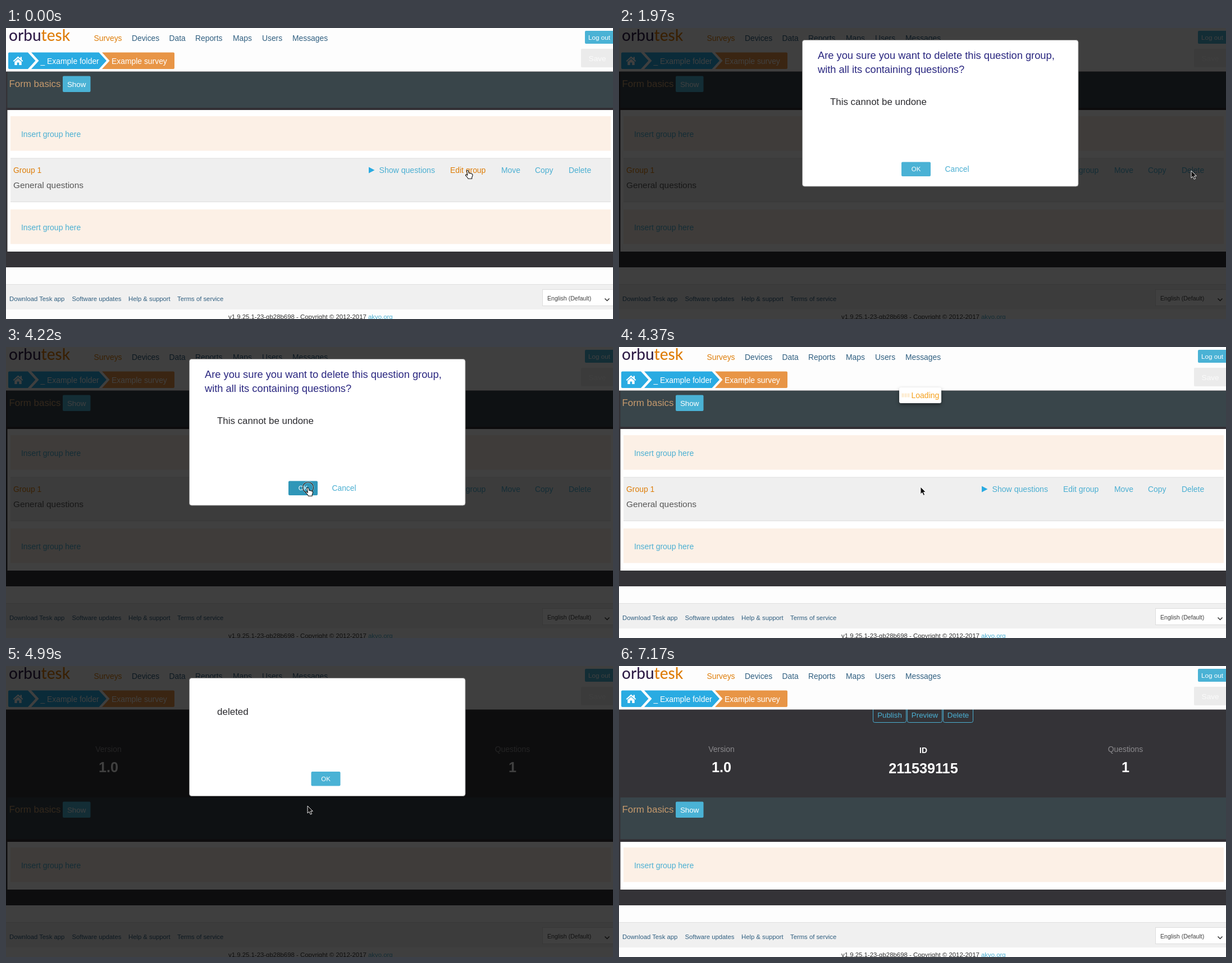
Animation, 1081 px wide and 518 px high, one loop 8170 ms. Source, as an HTML page:

```html
<!DOCTYPE html>
<html lang="en">
<head>
<meta charset="utf-8">
<title>Delete a question group</title>
<style>
html, body { margin: 0; width: 100%; height: 100%; overflow: hidden; background: #fdfdfd; }
svg { display: block; font-family: "Liberation Sans", Arial, sans-serif; }
text { white-space: pre; }
#pill rect:first-child { filter: drop-shadow(0 3px 3px #0006); }
</style>
</head>
<body>
<svg id="stage" width="1081" height="518" viewBox="0 0 1081 518"></svg>
<script>
const LOOP = 8170;
const BLUE = '#29abe2', TEAL = '#4bafd2', BUTTON = '#4ab2d5', PRESSED = '#2f96b8';
const ORANGE = '#de7d08', NAVY = '#305f80', DARK = '#343337';

const rect = (x, y, w, h, fill, more = '') =>
  `<rect x="${x}" y="${y}" width="${w}" height="${h}" fill="${fill}" ${more}/>`;
const text = (x, y, size, fill, str, more = '') =>
  `<text x="${x}" y="${y}" font-size="${size}" fill="${fill}" ${more}>${str}</text>`;
const path = (d, fill, more = '') => `<path d="${d}" fill="${fill}" ${more}/>`;
const group = (id, ...parts) => `<g id="${id}">${parts.join('')}</g>`;
const row = (y, size, fill, items) =>
  items.map(([x, str, more]) => text(x, y, size, fill, str, more)).join('');
const middle = 'text-anchor="middle"', bold = middle + ' font-weight="bold"';

const insertBar = y =>
  rect(8, y, 1069, 61.5, '#fcf0e6') + text(27, y + 36.5, 13.95, TEAL, 'Insert group here');

const basics = (y, h) =>
  rect(2.5, y, 1079, h, '#39454a') + rect(0, y + h, 1081, 4, '#322f34') +
  text(5.5, y + 27, 16.9, '#c69a6d', 'Form basics') +
  rect(101, y + 7.5, 49.5, 28.5, BUTTON, 'rx="2"') +
  text(125.7, y + 27, 13.4, '#fff', 'Show', middle);

const outlined = (x, w, str) =>
  rect(x + .5, 70, w, 30.5, 'none', `stroke="${TEAL}" rx="3"`) +
  text(x + w / 2 + .5, 92, 13.3, TEAL, str, middle);

const stat = (x, y, label, value, color, weight) =>
  text(x, y, 13.9, color, label, weight) + text(x, y + 36, 25.2, '#fff', value, bold);

const modal = (id, h, okX, ...parts) => group(id,
  rect(0, 0, 1081, 518, '#000', 'opacity=".75"'),
  rect(326.5, 21.5, 491.5, h, '#fff', 'rx="4" stroke="#8a8a8a"'),
  rect(okX, h - 22, 52, 25.5, BUTTON, `rx="2" id="${id}Ok"`),
  text(okX + 26, h - 5.5, 11.4, '#fff', 'OK', middle), ...parts);

const actions = [['edit', 791, 64, 'Edit group'], ['move', 882, 34, 'Move'],
  ['copy', 942, 33, 'Copy'], ['del', 1002, 39, 'Delete']];

const listPage = group('list',
  basics(78, 64),
  rect(2.5, 146, 1079, 252, '#fff'),
  insertBar(157),
  rect(8, 232, 1069, 78, '#efefef'),
  rect(8, 231.5, 1069, 1, '#dedede'), rect(8, 309, 1069, 1, '#dedede'),
  text(13, 258, 13.9, ORANGE, 'Group 1'),
  text(13, 285, 15.4, '#575757', 'General questions'),
  path('M646 247.5L656.5 253L646 258.5Z', BLUE),
  text(664.5, 258, 14.1, TEAL, 'Show questions'),
  ...actions.map(([id, x, , str]) => text(x, 258, 13.9, TEAL, str, `id="${id}"`)));

const emptyPage = group('empty',
  outlined(452, 59, 'Publish'), outlined(513, 62, 'Preview'), outlined(577, 53, 'Delete'),
  stat(182.5, 153, 'Version', '1.0', '#8b8a8d', middle),
  stat(542, 155, 'ID', '211539115', '#fff', bold),
  stat(902, 153, 'Questions', '1', '#8b8a8d', middle),
  basics(234, 74.5),
  rect(2.5, 313, 1079, 85, '#fff'));

const header =
  rect(0, 0, 1081, 77.5, '#fdfdfd') +
  text(5, 22.5, 28, '#33204a', `orbu<tspan fill="${ORANGE}">tesk</tspan>`,
    'font-family="Lato, sans-serif" font-weight="500"') +
  row(23, 13.85, NAVY, [[156.5, 'Surveys', `style="fill:${ORANGE}"`], [224, 'Devices'],
    [290.5, 'Data'], [337, 'Reports'], [404, 'Maps'], [456, 'Users'], [510, 'Messages']]) +
  rect(1031, 5, 60, 23, BUTTON, 'rx="2"') + text(1037, 20.5, 11.7, '#fff', 'Log out') +
  rect(1024, 37, 60, 33, '#ebebeb', 'rx="2"') + text(1037.5, 59, 13.7, '#fafafa', 'Save') +
  path('M6 43.5H39L52.5 58.3L39 73H6Q4 73 4 71V45.5Q4 43.5 6 43.5Z', BLUE) +
  path('M45 43.5H165.5L179 58.3L165.5 73H45L58.5 58.3Z', BLUE) +
  path('M171 43.5H298Q300 43.5 300 45.5V71Q300 73 298 73H171L184.5 58.3Z', '#e89546') +
  path('M21.5 50.5L25.5 54V51.5H28V56.3L30.3 58.5L29 60L21.5 53.5L14 60L12.7 58.5Z' +
    'M21.5 55L27.7 60.3V66H23.3V61.5H19.7V66H15.3V60.3Z', '#fff') +
  row(63.5, 13.9, '#fff', [[61.5, '_ Example folder'], [188, 'Example survey']]);

const footer =
  rect(0, 426, 1081, 92, '#fdfdfd') + rect(0, 456.5, 1081, 44.5, '#f0f0f0') +
  rect(0, 456, 1081, 1, '#e0e0e0') +
  row(486, 11.3, NAVY, [[6, 'Download Tesk app'], [117.5, 'Software updates'],
    [218, 'Help &amp; support'], [305, 'Terms of service']]) +
  rect(955.5, 465.5, 130, 29, '#fff', 'stroke="#dcdcdc"') +
  text(964, 484.5, 10.6, '#444', 'English (Default)') +
  path('M1066.5 481.5L1070.5 485.5L1074.5 481.5', 'none', 'stroke="#333" stroke-width="1.5"') +
  text(396, 518, 11.4, '#333', 'v1.9.25.1-23-gb28b698 - Copyright © 2012-2017') +
  text(645, 518, 11.4, TEAL, 'akvo.org');

const pill = group('pill',
  rect(499, 72, 75, 28, '#fff', 'rx="3" id="pillBox"'),
  ...[0, 1, 2].map(i => rect(503.5 + i * 5, 82.5, 4, 7, '#f5a623', 'class="tick"')),
  text(520.5, 91, 14, '#f5a01c', '', 'id="pillText"'));

const cursor = group('cursor',
  group('ring', '<circle cx="1" cy="0" r="9.5" fill="none" stroke="#fff" stroke-opacity=".6" stroke-width="2.4"/>',
    '<circle cx="1" cy="0" r="9.5" fill="none" stroke="#111" stroke-width="1.2"/>'),
  path('M0 0V13L3 10.3L5.2 15.2L7.6 14.2L5.4 9.4H9.4Z', '#111',
    'id="arrow" stroke="#fff" stroke-width=".9"'),
  path('M-1 1Q.5-.6 1.8 1L2.8 5.4Q4.4 4.5 5.2 6Q6.8 5.2 7.6 6.8Q9.4 6.4 9.4 8.4Q9.6 11 8.2 12.6V15.2H1.6' +
    'Q.4 12.4-3 9.6Q-3.4 7.6-1.4 8L.4 9.2Z', '#fff',
    'id="hand" stroke="#111" stroke-width="1.1" stroke-linejoin="round"'));

document.getElementById('stage').innerHTML =
  rect(0, 0, 1081, 426, DARK) + listPage + emptyPage + insertBar(323) + header + footer + pill +
  modal('confirm', 260.5, 503,
    row(55, 18.3, '#2a2780', [[354, 'Are you sure you want to delete this question group,']]),
    row(80, 18.3, '#2a2780', [[354, 'with all its containing questions?']]),
    text(376, 137, 16.9, '#2b2b2f', 'This cannot be undone'),
    text(580.5, 255.5, 13.8, TEAL, 'Cancel')) +
  modal('done', 210, 543.5, text(376, 86.5, 17, '#2b2b2f', 'deleted')) + cursor;

// Pointer track: start time, x, y, shape; each pose holds until the next.
const track = [
  [0, 821.5, 253, 'hand'],
  [590, 842, 254, 'hand'], [750, 890, 256, 'hand'], [900, 952, 256, 'hand'],
  [1060, 1004, 255, 'hand'], [1220, 1019, 254, 'hand'], [1820, 1019, 254, 'arrow'],
  [2270, 1003, 257, 'arrow'], [2420, 915, 241, 'arrow'], [2570, 800, 206, 'arrow'],
  [2730, 683, 180, 'arrow'], [2880, 588, 180, 'arrow'], [3030, 548, 206, 'arrow'],
  [3180, 537, 250, 'arrow'], [3330, 537, 250, 'hand'], [4370, 537, 249, 'arrow'],
  [5590, 553, 218, 'arrow'], [5800, 562, 203, 'hand'], [6400, 562, 203, 'arrow'],
  [6700, 640, 208, 'arrow'], [6860, 803, 240, 'arrow'], [7010, 838, 434, 'arrow'],
  [7170, 0, 0, 'none'],
];

const $ = id => document.getElementById(id);
const show = (id, on) => $(id).style.display = on ? '' : 'none';

function draw(t) {
  const during = (from, to) => t >= from && t < to;
  const [, x, y, shape] = track.findLast(pose => pose[0] <= t);
  const confirm = during(1970, 4370), done = during(4990, 6400), listed = t < 4690;

  show('list', listed);
  show('empty', !listed);
  show('confirm', confirm);
  show('done', done);

  show('pill', during(4370, 4990));
  $('pillText').textContent = listed ? 'Loading' : 'Saving';
  $('pillBox').setAttribute('width', listed ? 75 : 67);
  const lit = Math.floor((t - 4370) / 155);
  document.querySelectorAll('.tick').forEach((tick, i) =>
    tick.setAttribute('opacity', listed ? .2 : [.04, .65, .25][(i + lit) % 3]));

  for (const [id, left, width] of actions)
    $(id).setAttribute('fill', t < 1970 && x >= left && x <= left + width ? ORANGE : TEAL);
  $('confirmOk').setAttribute('fill', during(3180, 4370) ? PRESSED : BUTTON);
  $('doneOk').setAttribute('fill', during(5800, 6400) ? PRESSED : BUTTON);

  show('arrow', shape === 'arrow');
  show('hand', shape === 'hand');
  show('ring', during(1820, 1970) || during(4220, 4370) || during(6250, 6400));
  $('cursor').setAttribute('transform', `translate(${x} ${y})`);
}

function tick() {
  draw(performance.now() % LOOP);
  requestAnimationFrame(tick);
}
tick();
</script>
</body>
</html>
```
